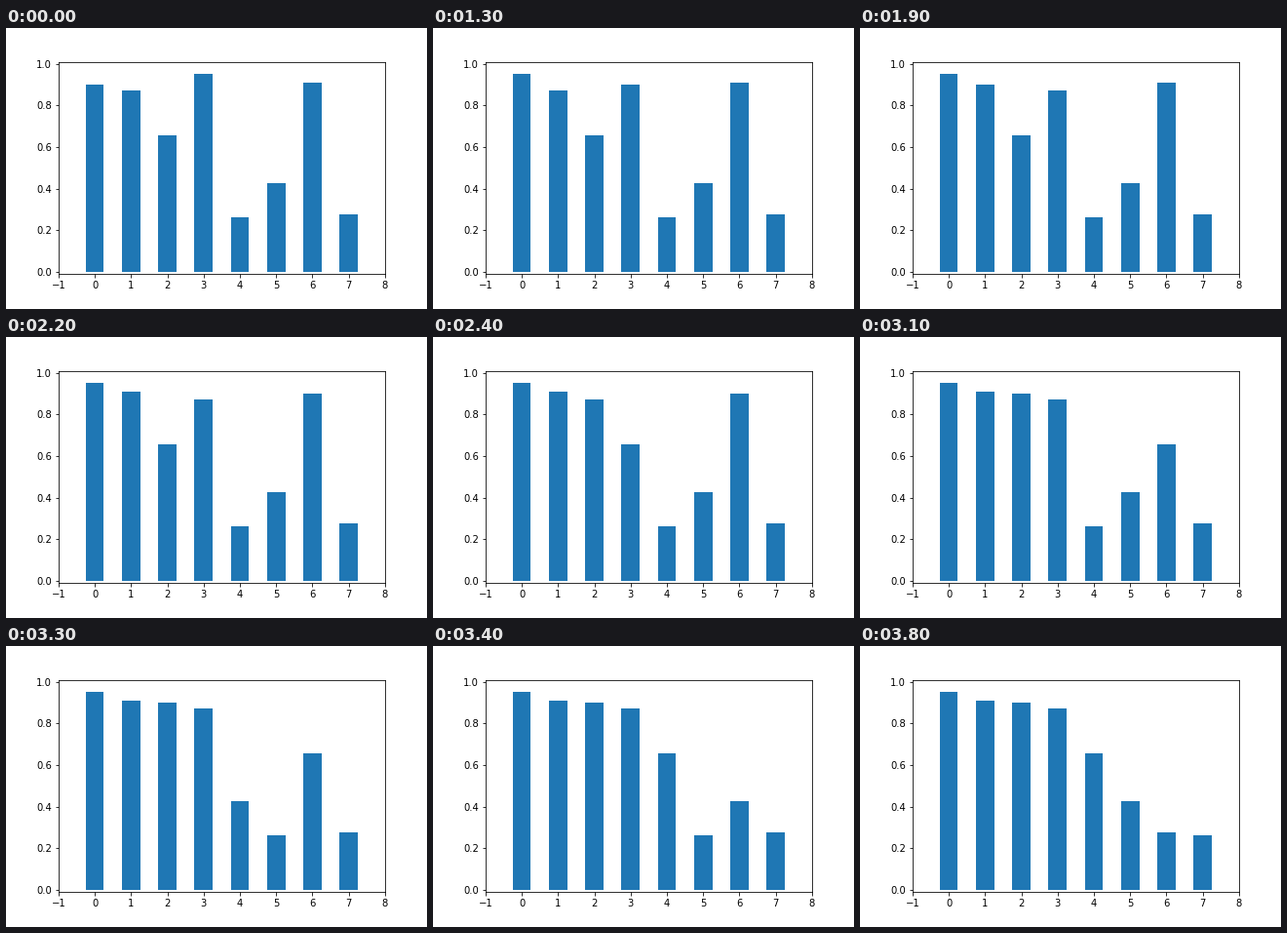
A matplotlib script for the animation above (4900 ms loop, 432 by 288 pixels).

```python
from itertools import combinations

import matplotlib.pyplot as plt
from matplotlib.animation import FuncAnimation

VALUES = [0.900, 0.871, 0.655, 0.953, 0.262, 0.427, 0.910, 0.275]
FRAMES = 49
INTERVAL = 100
FIRST_COMPARISON = 11  # the unsorted bars rest until this step

plt.rcParams["font.family"] = "DejaVu Sans"


def sort_states(values):
    """List the values after every comparison of a descending exchange sort."""
    values = list(values)
    states = [values[:]]
    for i, j in combinations(range(len(values)), 2):
        if values[j] > values[i]:
            values[i], values[j] = values[j], values[i]
        states.append(values[:])
    return states


STATES = sort_states(VALUES)

fig, ax = plt.subplots(figsize=(6, 4), dpi=72, facecolor="white")
fig.subplots_adjust(left=0.125, right=0.9, bottom=0.125, top=0.88)
ax.set_xlim(-1, 8)
ax.set_ylim(-0.01, 1.01)
ax.set_xticks(range(-1, 9))
ax.set_yticks([k / 5 for k in range(6)])
bars = ax.bar(range(len(VALUES)), VALUES, width=0.5, color="#1f77b4")


def update(frame):
    step = min(max(frame - FIRST_COMPARISON + 1, 0), len(STATES) - 1)
    for bar, height in zip(bars, STATES[step]):
        bar.set_height(height)
    return list(bars)


anim = FuncAnimation(fig, update, frames=FRAMES, interval=INTERVAL,
                     repeat=True, repeat_delay=0, blit=False)
plt.show()
```
